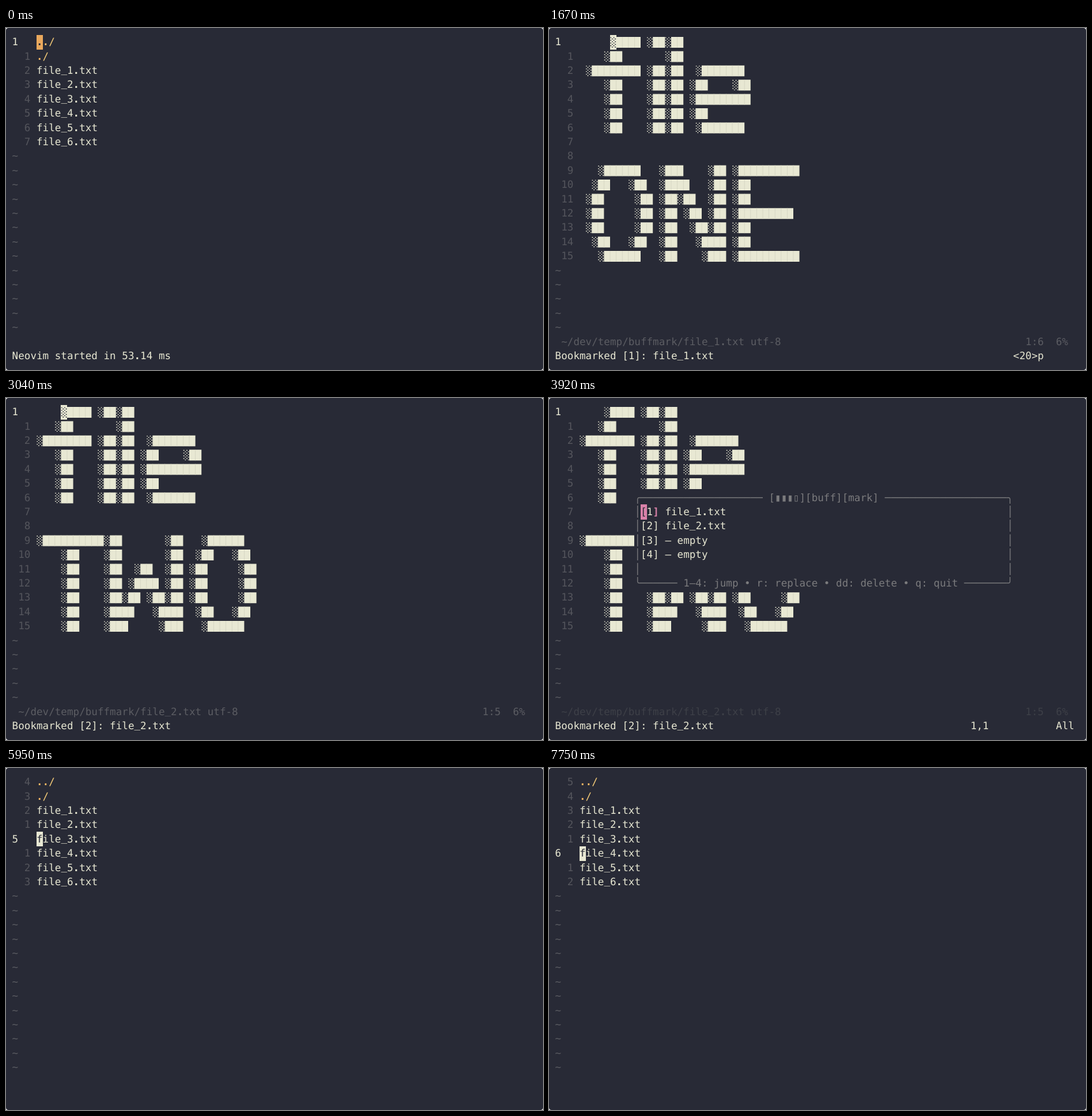
Recreate the animation shown at these times as an HTML page. Size 844x537 px, loop 8 s.

```html
<!DOCTYPE html>
<html lang="en">
<head>
<meta charset="utf-8">
<title>Buffer bookmarks</title>
<style>
  html, body { margin: 0; width: 100%; height: 100%; overflow: hidden; background: #fff; }
  svg { display: block; width: 844px; height: 537px; }
  text {
    font: 15.95px "DejaVu Sans Mono", monospace;
    white-space: pre;
    text-rendering: geometricPrecision;
  }
  .bold { font-weight: bold; }
  .raised { baseline-shift: 2px; }
</style>
</head>
<body>
<svg viewBox="0 0 844 537">
  <defs><path id="shade"/></defs>
  <rect width="844" height="537" rx="4" fill="#282a36"/>
  <g id="screen"></g>
</svg>
<script>
const LOOP = 8000;
const CW = 9.6, CH = 22.4, TOP = 11;
const C = {
  bg: "#282a36", fg: "#e8e8d3", num: "#55565d", tilde: "#5b5c62",
  status: "#5c5d63", faint: "#3e4048", frame: "#7b7b7d",
  dot: "#ffb964", slash: "#fad07a", orange: "#e8a75c", pink: "#d982a9", seam: "#d5d5c2"
};

// ':' is a light shade cell, '#' a full block
const FILE = [
  "    :#### :##:##",
  "   :##       :##",
  ":######## :##:##  :#######",
  "   :##    :##:## :##    :##",
  "   :##    :##:## :#########",
  "   :##    :##:## :##",
  "   :##    :##:##  :#######",
  "", ""
];
const WORDS = [
  [
    "   :######   :###    :## :##########",
    "  :##   :##  :####   :## :##",
    " :##     :## :##:##  :## :##",
    " :##     :## :## :## :## :#########",
    " :##     :## :##  :##:## :##",
    "  :##   :##  :##   :#### :##",
    "   :######   :##    :### :##########"
  ], [
    ":##########:##       :##   :######",
    "    :##    :##       :##  :##   :##",
    "    :##    :##  :##  :## :##     :##",
    "    :##    :## :#### :## :##     :##",
    "    :##    :##:## :##:## :##     :##",
    "    :##    :####   :####  :##   :##",
    "    :##    :###     :###   :######"
  ], [
    ":##########:##     :## :#########  :########## :##########",
    "    :##    :##     :## :##     :## :##         :##",
    "    :##    :##     :## :##     :## :##         :##",
    "    :##    :########## :#########  :#########  :#########",
    "    :##    :##     :## :##   :##   :##         :##",
    "    :##    :##     :## :##    :##  :##         :##",
    "    :##    :##     :## :##     :## :########## :##########"
  ]
];
const DIR = ["../", "./", ...[1, 2, 3, 4, 5, 6].map(n => `file_${n}.txt`)];

// Each step changes part of the editor state.
const openDir = { file: 0, line: 0, msg: "", cmd: "", ruler: false };
const openFile = n => ({ file: n, msg: "" });
const mark = n => ({ cmd: "", msg: `Bookmarked [${n}]: file_${n}.txt` });
const moveTo = line => ({ line, cmd: "" });
const type = cmd => ({ cmd });
const STEPS = [
  [0, { ...openDir, popup: false, msg: "Neovim started in 53.14 ms" }],
  [690, type("2")], [790, moveTo(2)], [970, openFile(1)],
  [1190, type("<20>")], [1290, mark(1)],
  [1630, type("<20>")], [1670, type("<20>p")], [1780, openDir],
  [2410, type("3")], [2530, moveTo(3)], [2720, openFile(2)],
  [2970, type("<20>")], [3040, mark(2)],
  [3920, { popup: true, ruler: true }], [4150, { msg: "" }], [4560, { popup: false }],
  [5240, type("<20>")], [5290, type("<20>p")], [5410, openDir],
  [5830, type("4")], [5950, moveTo(4)], [6210, openFile(3)],
  [6540, type("<20>")], [6600, mark(3)],
  [7030, type("<20>")], [7070, type("<20>p")], [7180, openDir],
  [7630, type("5")], [7750, moveTo(5)]
];

const px = v => +v.toFixed(2);
const X = col => px((col + 1) * CW);
const Y = row => px(TOP + row * CH);
const esc = s => s.replace(/&/g, "&amp;").replace(/</g, "&lt;");
const span = (name, s) => `<tspan class="${name}">${s}</tspan>`;
// Heavier dots and higher underscores
const glyphs = s => esc(s).replace(/[._]/g, c => span(c === "." ? "bold" : "raised", c));
const box = (x, y, w, h, fill) =>
  `<rect x="${x}" y="${y}" width="${px(w)}" height="${px(h)}" fill="${fill}"/>`;
const text = (col, row, s, fill = C.fg, name = "") =>
  `<text x="${X(col)}" y="${px(Y(row) + 16.2)}" fill="${fill}" class="${name}">${glyphs(s)}</text>`;

// Cell areas cover whole pixels.
function cells(col, row, w, h, fill) {
  const x = Math.floor(X(col)), y = Math.floor(Y(row));
  return box(x, y, Math.ceil(X(col + w)) - x, Math.ceil(Y(row + h)) - y, fill);
}
const shade = (col, row, fill) =>
  `<use href="#shade" x="${X(col)}" y="${Y(row)}" fill="${fill}"/>`;
const cursor = (col, row, ch, fill = C.fg) =>
  cells(col, row, 1, 1, fill) + text(col, row, ch, C.bg);

function makeShade() {
  let d = "";
  for (let r = 0; r < 8; r++)
    for (let c = 0; c < 2; c++)
      d += `M${px(0.4 + c * 4.8 + (r % 2) * 2.4)} ${px(3.4 + r * 2.12)}h1.5v1.4h-1.5z`;
  document.getElementById("shade").setAttribute("d", d);
}

function numbers(count, line) {
  let out = "";
  for (let r = 0; r < 21; r++) {
    const rel = String(Math.abs(r - line));
    if (r >= count) out += text(0, r, "~", C.tilde);
    else if (r === line) out += text(0, r, String(r + 1));
    else out += text(3 - rel.length, r, rel, C.num);
  }
  return out;
}

function drawDir(line) {
  let out = numbers(DIR.length, line);
  DIR.forEach((name, r) => {
    const dots = name.length - 1;
    out += r < 2
      ? text(4, r, name.slice(0, dots), C.dot) + text(4 + dots, r, "/", C.slash)
      : text(4, r, name);
  });
  return out + cursor(4, line, DIR[line][0], line < 2 ? C.orange : C.fg);
}

function drawArt(line, col, row) {
  let out = "";
  for (const m of line.matchAll(/:|#+/g)) {
    const c = col + m.index, n = m[0].length;
    if (m[0] === ":") { out += shade(c, row, C.fg); continue; }
    out += box(X(c), px(Y(row) + 3), n * CW, 17, C.fg);
    for (let i = 1; i < n; i++)
      out += box(px(X(c + i) - 0.4), px(Y(row) + 3), 0.8, 17, C.seam);
  }
  return out;
}

function drawFile(n, popup) {
  const indent = n === 1 ? 1 : 0, start = 8 + indent;
  const tone = popup ? C.faint : C.status;
  let out = numbers(16, 0);
  FILE.forEach((s, r) => out += drawArt(s, 4 + indent, r));
  WORDS[n - 1].forEach((s, r) => out += drawArt(s, 4, r + 9));
  out += text(1, 21, `~/dev/temp/buffmark/file_${n}.txt utf-8`, tone);
  out += text(77, 21, `1:${5 + indent}  6%`, tone);
  if (!popup) out += cells(start, 0, 1, 1, C.fg) + shade(start, 0, C.bg);
  return out;
}

function drawPopup() {
  const bar = n => "─".repeat(n);
  let out = cells(13, 6, 62, 7, C.bg);
  out += text(13, 6, `╭${bar(20)} [▮▮▮▯][buff][mark] ${bar(20)}╮`, C.frame);
  for (let r = 7; r < 12; r++) out += text(13, r, "│", C.frame) + text(74, r, "│", C.frame);
  out += text(13, 12, `╰${bar(6)} 1–4: jump • r: replace • dd: delete • q: quit ${bar(7)}╯`, C.frame);
  out += text(15, 7, "1") + text(16, 7, "]", C.pink, "bold") + text(18, 7, "file_1.txt");
  out += text(14, 8, "[2] file_2.txt");
  out += text(14, 9, "[3] – empty") + text(14, 10, "[4] – empty");
  return out + cursor(14, 7, "[", C.pink);
}

function draw(s) {
  let out = s.file ? drawFile(s.file, s.popup) : drawDir(s.line);
  if (s.popup) out += drawPopup();
  out += text(0, 22, s.msg) + text(75, 22, s.cmd);
  if (s.ruler) out += text(68, 22, "1,1") + text(82, 22, "All");
  return out;
}

const screen = document.getElementById("screen");
let shown = -1;
function update(now) {
  const t = now % LOOP;
  const past = STEPS.filter(([at]) => at <= t);
  if (past.length !== shown) {
    shown = past.length;
    screen.innerHTML = draw(Object.assign({}, ...past.map(p => p[1])));
  }
}

makeShade();
update(0);
const begin = performance.now();
function tick() {
  update(performance.now() - begin);
  requestAnimationFrame(tick);
}
requestAnimationFrame(tick);
</script>
</body>
</html>
```
